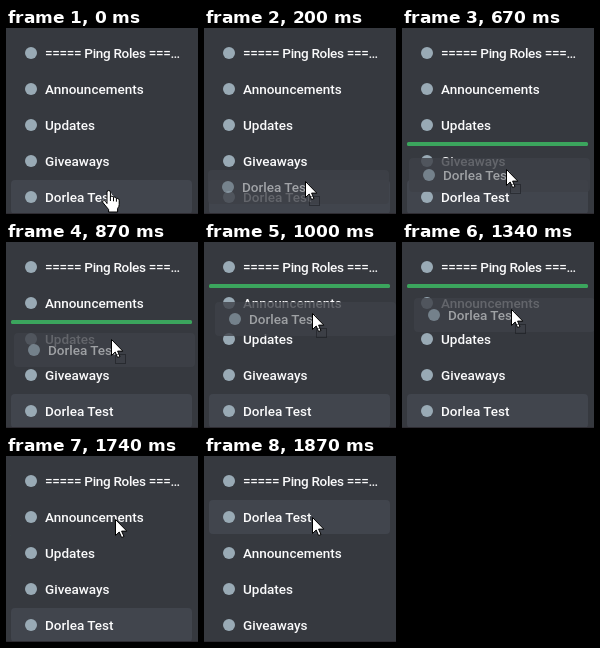
Write an HTML page that moves like this. It is 192x186 px and loops after 2.14 s.

```html
<!DOCTYPE html>
<html lang="en">
<head>
<meta charset="utf-8">
<title>Reordering roles</title>
<style>
  html, body { margin: 0; width: 100%; height: 100%; overflow: hidden; background: #36393f; }
  svg { display: block; width: 192px; height: 186px; }
  text { font: 500 13.5px Roboto, "Open Sans", sans-serif; fill: #fafafb; white-space: pre; }
  .title { letter-spacing: -0.3px; }
  .dot { fill: #99aab5; }
  .box { fill: #41454d; }
  #ghost { opacity: .8; }
  #ghost text { fill: #b9bbbe; }
  #ghost .dot { fill: #84939e; }
  #ghost .box { fill: #3e4148; }
  .pointer { fill: #fff; stroke: #000; stroke-width: 1; stroke-linejoin: round; }
</style>
</head>
<body>
<svg viewBox="0 0 192 186">
  <rect width="192" height="186" fill="#36393f"/>
  <rect id="hover" class="box" x="5" width="181" height="34" rx="4"/>
  <g id="list"></g>
  <rect y="185" width="192" height="1" fill="#2e2c32"/>
  <rect id="line" x="5" width="181" height="4" rx="1.5" fill="#3ba55d"/>
  <g id="ghost"><rect class="box" x="5" y="152" width="181" height="34" rx="4"/></g>
  <g id="arrow">
    <path class="pointer" d="M.5 .5V16.5L4.2 13L6.6 18.5L9 17.5L6.6 12.1H11.8Z"/>
    <rect id="badge" x="4.5" y="15.5" width="10" height="9" fill="none" stroke="#15161a" stroke-dasharray="1 1"/>
  </g>
  <g id="hand">
    <path class="pointer" d="M-2 13V1.6Q-2 0 -.3 0Q1.4 0 1.4 1.6V6.6Q1.7 5.4 3 5.6Q4.5 5.8 4.5 7.2Q5 6.3 6.1 6.6Q7.4 7 7.4 8.3Q8 7.6 9 8Q10.2 8.5 10.2 10V14Q10.2 16 8.6 18V21.5H-.4V19L-6 12.2Q-6.8 10.8 -5.6 10.2Q-4.4 9.7 -3.3 11Z"/>
    <path d="M1.4 6.5V10.5M4.5 7V10.8M7.4 8.3V11.2" stroke="#000" fill="none"/>
  </g>
</svg>
<script>
const LOOP = 2140, PITCH = 36, FIRST = 25;
const TITLE = "===== Ping Roles ===…", MOVED = "Dorlea Test";
const OTHERS = ["Announcements", "Updates", "Giveaways"];

// time, drag offset x and y, extra pointer y while the ghost lags behind
const DRAG = [
  [0, 0, 0, 0], [70, 0, -3, 0], [140, -1, -6, 0], [200, -1, -10, 0],
  [270, -2, -13, 0], [340, -2, -15, 0], [540, 0, -18, 0], [600, 1, -20, 0],
  [670, 2, -22, 0], [740, 2, -32, -3], [800, 3, -46, -5], [870, 3, -61, -5],
  [940, 5, -80, -3], [1000, 6, -92, 0], [1200, 6, -93, 0], [1270, 7, -95, 0],
  [1340, 7, -96, 0], [1400, 7, -97, 0], [1470, 7, -98, 0], [1670, 7, -99, 0],
  [1740, 7, -100, 0], [1800, 6, -101, 0], [1870, 6, -102, 0]
];
const GRAB = 140, DROP = 1740, REORDER = 1800;

const $ = id => document.getElementById(id);
const move = (el, x, y) => el.setAttribute("transform", `translate(${x} ${y})`);
const show = (el, on) => { el.style.display = on ? "" : "none"; };
const rowY = i => FIRST + PITCH * i;

function addTo(parent, tag, attrs, label = "") {
  const el = document.createElementNS("http://www.w3.org/2000/svg", tag);
  for (const key in attrs) el.setAttribute(key, attrs[key]);
  el.textContent = label;
  return parent.appendChild(el);
}

function addRole(parent, label, y) {
  const g = addTo(parent, "g", {});
  addTo(g, "circle", { class: "dot", cx: 25, cy: 0, r: 6 });
  addTo(g, "text", { class: label === TITLE ? "title" : "role", x: 39, y: 5 }, label);
  move(g, 0, y);
  return g;
}

const before = [TITLE, ...OTHERS, MOVED];
const after = [TITLE, MOVED, ...OTHERS];
const rows = before.map((label, i) => addRole($("list"), label, rowY(i)));
addRole($("ghost"), MOVED, rowY(4));

function draw(t) {
  const [, dx, dy, lead] = DRAG.findLast(step => step[0] <= t);
  const dragging = t >= GRAB && t < DROP;
  const done = t >= REORDER;
  const tipX = 103 + dx, tipY = 163.5 + dy + lead;

  const order = done ? after : before;
  rows.forEach((row, i) => move(row, 0, rowY(order.indexOf(before[i]))));
  $("hover").setAttribute("y", rowY(done ? 1 : 4) - 17);

  // the drop line sits above the row under the pointer
  const target = Math.floor((tipY - 8) / PITCH);
  show($("line"), dragging && target < 4);
  $("line").setAttribute("y", 6 + PITCH * target);

  show($("ghost"), dragging);
  move($("ghost"), dx, dy);
  show($("hand"), t < GRAB);
  move($("hand"), tipX, tipY - 1);
  show($("arrow"), t >= GRAB);
  move($("arrow"), tipX - 1, Math.floor(tipY));
  show($("badge"), dragging);
}

const start = performance.now();
function tick() {
  draw((performance.now() - start) % LOOP);
  requestAnimationFrame(tick);
}
tick();
</script>
</body>
</html>
```
